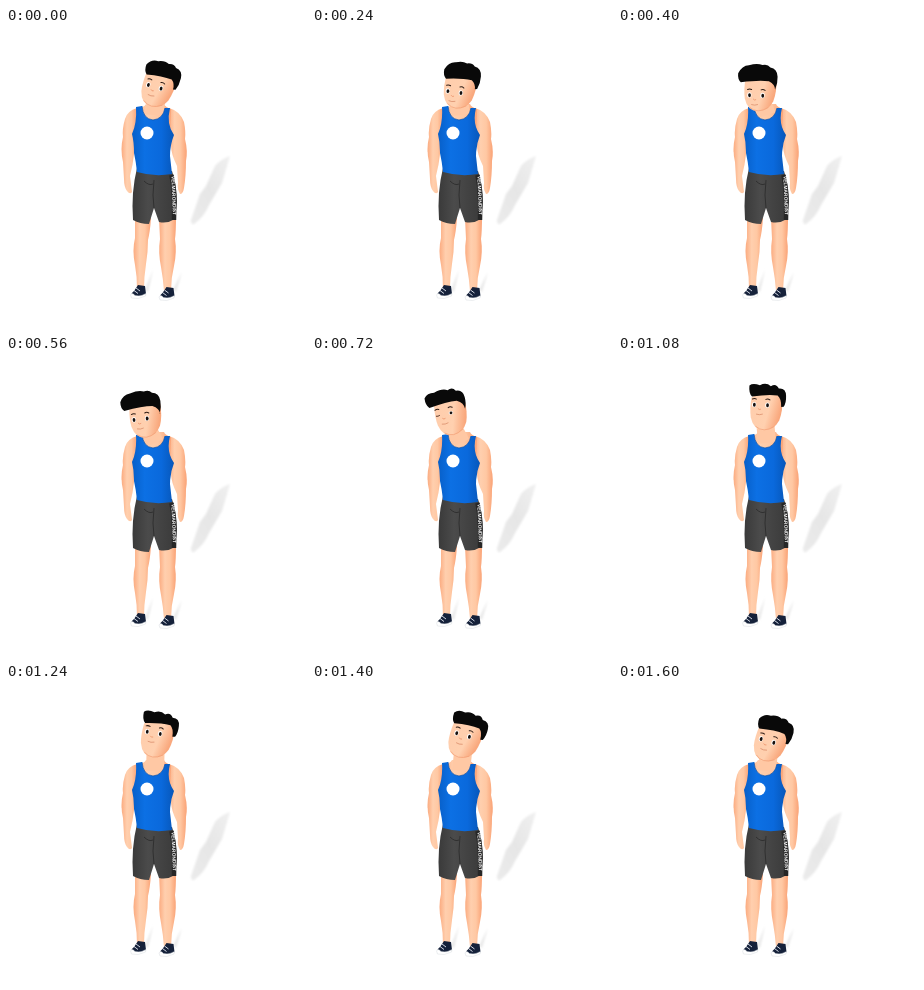
An HTML page for the animation above (1640 ms loop, 300 by 300 pixels).

```html
<!DOCTYPE html>
<html lang="en">
<head>
<meta charset="utf-8">
<title>Neck circles</title>
<style>
html, body { margin: 0; width: 100%; height: 100%; overflow: hidden; background: #fff; }
svg { display: block; width: 100vw; height: 100vh; }
</style>
</head>
<body>
<svg viewBox="0 0 300 300">
  <defs>
    <linearGradient id="skin" x1="0" x2="1">
      <stop offset="0" stop-color="#fbab80"/><stop offset=".35" stop-color="#ffcfae"/>
      <stop offset=".65" stop-color="#ffc8a3"/><stop offset="1" stop-color="#faa275"/>
    </linearGradient>
    <linearGradient id="face" x1="0" x2="1" y2=".3">
      <stop offset="0" stop-color="#ffcdac"/><stop offset=".65" stop-color="#ffd0af"/><stop offset="1" stop-color="#f9a87d"/>
    </linearGradient>
    <linearGradient id="shirt" x1="0" x2="1">
      <stop offset="0" stop-color="#075fc8"/><stop offset=".3" stop-color="#0c70e4"/>
      <stop offset=".7" stop-color="#0a69dc"/><stop offset="1" stop-color="#0757ba"/>
    </linearGradient>
    <linearGradient id="cloth" x1="0" x2="1">
      <stop offset="0" stop-color="#3a3a3a"/><stop offset=".35" stop-color="#4b4b4b"/><stop offset="1" stop-color="#393939"/>
    </linearGradient>
    <linearGradient id="shade" x1="1" y1="0" x2="0" y2="1">
      <stop offset="0" stop-color="#f0f0f0"/><stop offset=".5" stop-color="#e6e6e6"/><stop offset="1" stop-color="#ebebeb"/>
    </linearGradient>
    <filter id="soft" x="-20%" y="-20%" width="140%" height="140%"><feGaussianBlur stdDeviation=".8"/></filter>
  </defs>

  <g filter="url(#soft)">
    <path fill="url(#shade)" d="M224 128Q215 131 209 138L200 158L194 166L185 192Q185 197 188 196Q198 189 203 177L216 155Z"/>
    <path fill="#e8e8e8" d="M139 262L147 242L142 264ZM167 262L176 244L170 264Z"/>
  </g>

  <g fill="url(#skin)">
    <path d="M129 188L145 190Q144 204 142 212Q142 224 140 236Q138 249 138 261L131 261Q131 248 129 237Q126 222 129 210Z"/>
    <path d="M153 190L170 188Q170 204 169 211Q171 224 168 238Q165 250 165 263L158 263Q157 250 155 239Q152 224 154 211Z"/>
    <path d="M131 80Q121 83 119 91Q116 101 117 109Q114 121 117 134L118 151Q118 159 121 163Q124 167 126 164L124 148Q127 136 128 126L131 107Z"/>
    <path d="M163 80Q174 83 178 94Q180 104 179 111Q182 123 180 133Q180 148 178 160Q177 166 174 166Q171 161 172 155L171 138Q165 126 165 117L162 104Z"/>
    <path d="M140 76L158 76Q159 79 165 81L164 107L129 107L131 80Q138 80 140 76Z"/>
  </g>

  <path id="neck" fill="none" stroke="#ffc8a4" stroke-width="18"/>

  <path fill="url(#cloth)" d="M131 140L166 143Q171 158 171 174L169 191Q161 196 153 194L148 180L143 196Q134 196 127 192Q125 164 131 140Z"/>
  <path fill="none" stroke="#303030" stroke-width="1" d="M148 152Q146 168 148 180M138 153Q143 158 147 156"/>
  <path fill="none" stroke="#262626" stroke-width="4.500" d="M165.500 147Q169 164 168 192"/>
  <text transform="translate(165.500 148) rotate(88)" fill="#fff" font-family="Arial, 'Liberation Sans', sans-serif" font-weight="700" font-size="4.900">VELMARONDIST</text>

  <path fill="url(#shirt)" d="M130 79L136 78Q137 91 147 92Q157 91 159 80L164 80Q160 96 168 107Q164 117 164 128L166 146Q148 149 131 144Q130 134 128 125Q128 114 126 106Q131 95 130 79Z"/>
  <path fill="none" stroke="#0751ad" stroke-width=".7" d="M136 78Q137 91 147 92Q157 91 159 80"/>
  <circle cx="141" cy="105" r="6.500" fill="#fff"/>

  <g id="shoe">
    <path fill="#15213a" d="M132 257L139 258L140 266Q134 271 126 269Q124 266 128 263Z"/>
    <path fill="#fff" stroke="#cfd3da" stroke-width=".4" d="M124.500 267Q126 264 129 267.500Q135 269 140 265.500L139.500 268Q132 272 125.500 270Z"/>
    <path fill="none" stroke="#e8ecf5" stroke-width=".9" d="M130 260L134 263M128 262.500L132 265.500"/>
  </g>
  <use href="#shoe" transform="translate(28.5 2)"/>

  <g id="head">
    <path fill="url(#face)" d="M-14 -14Q-15.500 -2 -14 6Q-11 18 -1 18.500Q10 17.500 14.500 8Q18 -2 17 -15Q0 -24 -14 -14Z"/>
    <path fill="none" stroke="#f3a077" stroke-width=".7" d="M-9 14.500Q-1 21.500 10 14"/>
    <g id="features">
      <g id="eyes"></g>
      <path fill="none" stroke="#2e1c15" stroke-width="1" stroke-linecap="round" d="M-8.500 -5.500Q-6.500 -6.500 -4.500 -5.600M5 -5.600Q7 -6.700 9 -5.200"/>
      <path fill="none" stroke="#ee9c74" stroke-width=".9" stroke-linecap="round" d="M-2.500 4Q-1.500 5.500 0 4.500"/>
      <path fill="none" stroke="#d88a68" stroke-width=".7" stroke-linecap="round" d="M-4 9.500Q-1 10.500 2 9.300"/>
    </g>
    <path id="hair" fill="#090909"/>
  </g>
</svg>
<script>
const LOOP = 1640, STEP = 40;
const el = id => document.getElementById(id);

// time, head x, head y, tilt, face x, face y, hair shift
const poses = [
  [0, 150.5, 61, 16, -2.5, -1.8, 0],
  [240, 146.5, 62.5, 8, -4, 2, -0.5],
  [400, 141, 65, 2, -3, 2.4, -5],
  [720, 138.5, 61, -11, -5.5, -4, -5.5],
  [1080, 147, 56, 2, -4.5, -7, 0],
  [1400, 151.5, 56, 16, -2, -4.8, 0],
  [1600, 151, 59.5, 16.5, -2.4, -2.2, 0]
];
const count = poses.length;

function key(i) {
  const turn = Math.floor(i / count);
  const p = poses[i - turn * count].slice();
  p[0] += turn * LOOP;
  return p;
}

// Cubic curve through the poses, closed over the loop
function poseAt(t) {
  let i = count - 1;
  while (poses[i][0] > t) i--;
  const [a, b, c, d] = [i - 1, i, i + 1, i + 2].map(key);
  const span = c[0] - b[0], u = (t - b[0]) / span;
  const u2 = u * u, u3 = u2 * u;
  return b.slice(1).map((v, n) => {
    const k = n + 1;
    const m0 = (c[k] - a[k]) / (c[0] - a[0]) * span;
    const m1 = (d[k] - b[k]) / (d[0] - b[0]) * span;
    return (2 * u3 - 3 * u2 + 1) * v + (u3 - 2 * u2 + u) * m0 +
      (3 * u2 - 2 * u3) * c[k] + (u3 - u2) * m1;
  });
}

function eye(x, open) {
  if (open < 0.3) return `<path d="M${x - 2} .5Q${x} 1.3 ${x + 2} .3" fill="none" stroke="#5a382b" stroke-width=".9"/>`;
  return `<g transform="translate(${x} 0) scale(1 ${open})">` +
    '<ellipse rx="2.2" ry="2.7" fill="#fff"/><ellipse cx=".2" cy=".1" rx="1.4" ry="2" fill="#17100d"/></g>';
}

// Looking up lifts the fringe and shows the waves of the quiff
function hairPath(shift, look) {
  const up = Math.min(1, Math.max(0, -look / 7));
  const low = -10 - up * 5, side = -4 - up * 2;
  const left = v => v + shift, right = v => v + shift / 2;
  return `M${left(-13.5)} ${low}Q${left(-17)} ${low - 3} ${left(-16.5)} ${-19 - up * 7}` +
    `Q${left(-13)} ${-27 - up * 2} ${left(-6)} ${-27.5 + up}` +
    `Q${right(0)} -30 ${right(5)} ${-28 + up * 2}` +
    `Q${right(10)} -29.5 ${right(13)} ${-26 + up * 2}` +
    `Q${right(20)} -25 ${right(20.5)} -17Q${right(21)} -10 ${right(18.5)} ${side}L16 ${side + 0.5}` +
    `Q16 ${low + 1} ${right(12)} ${low - 2}Q${right(2)} ${low - 3} ${left(-13.5)} ${low}Z`;
}

function draw(t) {
  const [x, y, tilt, fx, fy, shift] = poseAt(t);
  const blink = Math.exp(-(((t - 720) / 65) ** 2));
  el("head").setAttribute("transform", `translate(${x} ${y}) rotate(${tilt})`);
  el("features").setAttribute("transform", `translate(${fx} ${fy})`);
  el("eyes").innerHTML = eye(-6.6, 1 - 0.9 * blink) + eye(6.6, 1 - 0.35 * blink);
  el("hair").setAttribute("d", hairPath(shift, fy));
  el("neck").setAttribute("d", `M${x} ${y + 8}Q${(x + 149) / 2} 76 149 87`);
}

function tick() {
  const t = performance.now() % LOOP;
  draw(Math.floor(t / STEP) * STEP);
  requestAnimationFrame(tick);
}
draw(0);
requestAnimationFrame(tick);
</script>
</body>
</html>
```
